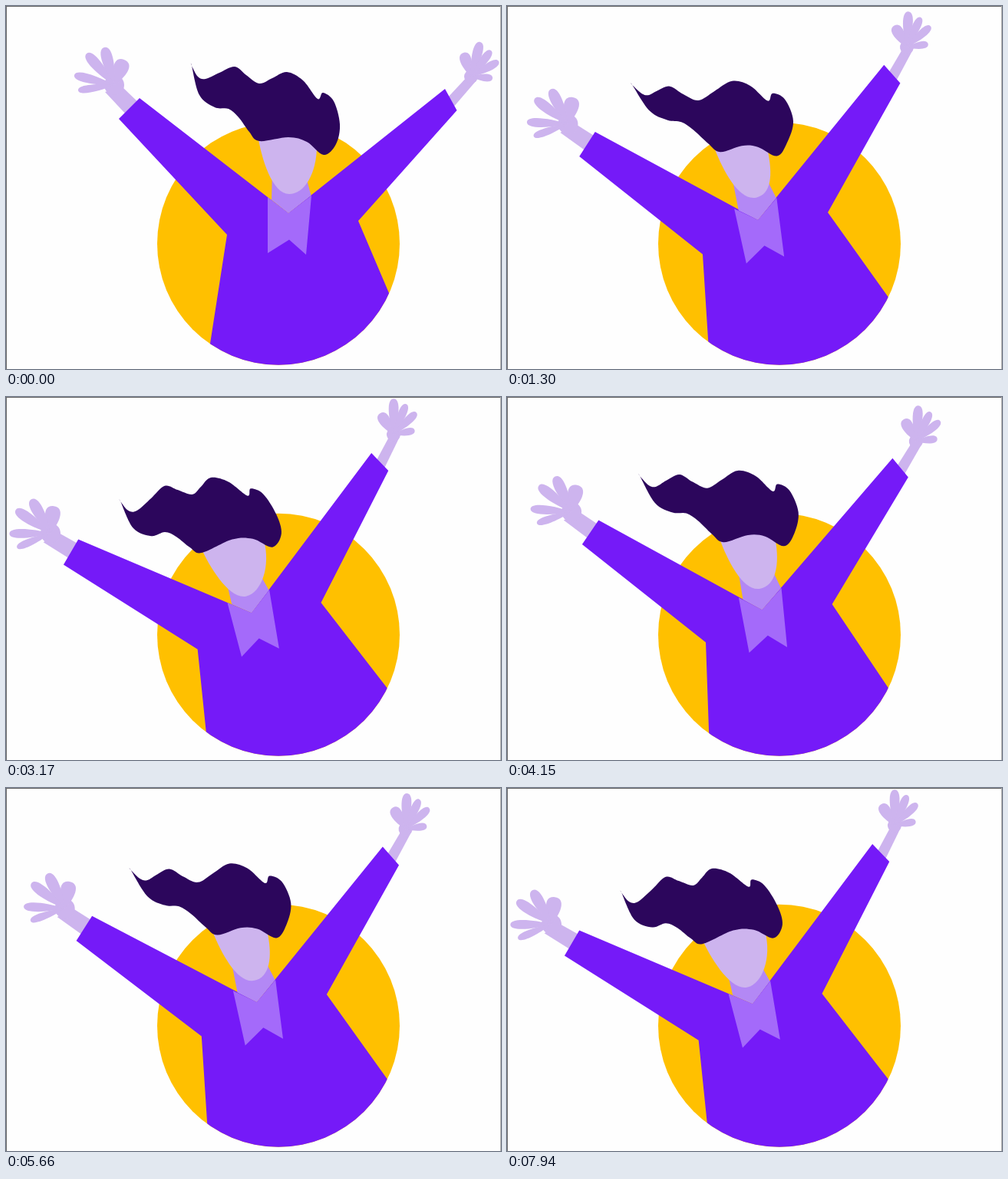
An HTML page with a canvas that plays this animation: 645 by 473 pixels, repeating every 8 s.

```html
<!DOCTYPE html>
<html lang="en">
<head>
<meta charset="utf-8">
<style>
  html, body { margin: 0; width: 100%; height: 100%; overflow: hidden; background: #fefefe; }
  canvas { display: block; }
</style>
</head>
<body>
<canvas id="stage" width="645" height="473"></canvas>
<script>
const ctx = document.getElementById('stage').getContext('2d');
const LOOP = 8000, CYCLE = 4835;
const YELLOW = '#ffc000', PURPLE = '#751af8', SKIN = '#cdb4ee',
      NECK = '#b388f5', COLLAR = '#a46afa', HAIR = '#2c065c';

// Key points of the hair at rest, from the tail along the top and back below
const HAIR_SHAPE = [
  [242, 78], [242, 78], [250, 92], [260, 95], [278, 87], [298, 79], [313, 90], [330, 101],
  [347, 94], [366, 86], [387, 97], [406, 121], [413, 113], [427, 124], [435, 154], [430, 180],
  [414, 194], [392, 177], [368, 171], [330, 176], [317, 164], [303, 145], [290, 134],
  [272, 132], [252, 116]
];

// 0 to 1 between two times, cosine eased
function ease(t, from, to) {
  const p = Math.min(1, Math.max(0, (t - from) / (to - from)));
  return (1 - Math.cos(Math.PI * p)) / 2;
}
const bump = (t, from, peak, to) => ease(t, from, peak) - ease(t, peak, to);

function swayAngle(t) {
  return -14.7 * (bump(t, 42, 1089, 1110) + ease(t, 1089, 1110)
    - ease(t, 1120, 1830) + ease(t, 1872, 2962) - ease(t, 3770, 4877));
}

function armWave(t) {
  return 2 * (bump(t, 0, 520, 1050) + bump(t, 1060, 1540, 1950)
    + bump(t, 2250, 2640, 3020) + bump(t, 3300, 3800, 4350));
}

// A ripple runs through the hair while the tail rises
function ripple([x, y], lift) {
  const tail = Math.min(1, Math.max(0, (320 - x + 0.3 * (y - 100)) / 60));
  const phase = Math.PI * (x - 298 - 1.2 * (y - 85)) / 80;
  return [x + lift * (2 - 7 * Math.cos(phase)), y - lift * 15 * tail];
}

function fill(color, path) {
  ctx.fillStyle = color;
  ctx.fill(path);
}

function polygon(color, points) {
  const path = new Path2D();
  points.forEach(([x, y]) => path.lineTo(x, y));
  fill(color, path);
}

function blob(color, points) {
  const n = points.length, at = i => points[(i + n) % n];
  const path = new Path2D();
  path.moveTo(...at(0));
  for (let i = 0; i < n; i++) {
    const [a, b, c, d] = [at(i - 1), at(i), at(i + 1), at(i + 2)];
    path.bezierCurveTo(b[0] + (c[0] - a[0]) / 6, b[1] + (c[1] - a[1]) / 6,
                       c[0] - (d[0] - b[0]) / 6, c[1] - (d[1] - b[1]) / 6, c[0], c[1]);
  }
  fill(color, path);
}

// Teardrop fingers spread from the palm; each is tip x, tip y, width
function hand([px, py], radius, fingers) {
  const palm = new Path2D();
  palm.arc(px, py, radius, 0, 7);
  fill(SKIN, palm);
  for (const [x, y, w] of fingers) {
    const length = Math.hypot(x - px, y - py);
    const drop = new Path2D();
    drop.bezierCurveTo;
    drop.moveTo(0, 0);
    drop.bezierCurveTo(0.4 * length, -0.5 * w, length, -0.8 * w, length, 0);
    drop.bezierCurveTo(length, 0.8 * w, 0.4 * length, 0.5 * w, 0, 0);
    ctx.save();
    ctx.translate(px, py);
    ctx.rotate(Math.atan2(y - py, x - px));
    fill(SKIN, drop);
    ctx.restore();
  }
}

function turn(degrees, x, y) {
  ctx.translate(x, y);
  ctx.rotate(degrees * Math.PI / 180);
  ctx.translate(-x, -y);
}

function drawHands(wave, dx, dy) {
  ctx.save();
  ctx.translate(dx, dy);
  turn(1.3 * wave, 160, 133);
  polygon(SKIN, [[151, 105], [176, 129], [158, 143], [129, 112]]);
  hand([141, 103], 13, [[154, 70, 20], [128, 54, 15], [105, 62, 14], [89, 90, 12], [94, 110, 10]]);
  ctx.restore();

  polygon(SKIN, [[602, 91], [574, 121], [582, 133], [613, 97]]);
  hand([606, 92], 9, [[596, 61, 15], [618, 47, 13], [632, 58, 11], [642, 72, 11], [634, 94, 10]]);
}

function drawFace(lift) {
  const x = 369 + 3 * lift, y = 245 - 4 * lift;
  const left = 328 + 5 * lift, right = 405 - 5 * lift;
  fill(SKIN, new Path2D(`M${left} 168C${left + 5} 200 ${x - 22} ${y} ${x} ${y}
    C${x + 20} ${y} ${right} 218 ${right} 182L380 160Z`));
}

function draw(time) {
  const t = time % CYCLE;
  const wave = armWave(t);
  const lift = Math.min(wave, 1.5) - 0.57 * bump(t, 2600, 3105, 3700);
  const dx = 11.5 * wave, dy = -8 * wave;

  ctx.fillStyle = '#fefefe';
  ctx.fillRect(0, 0, 645, 473);
  const disc = new Path2D();
  disc.arc(355, 309.7, 158, 0, 7);
  fill(YELLOW, disc);

  ctx.save();
  // The body is cut off by the disc at the bottom only
  const mask = new Path2D(disc);
  mask.rect(0, 0, 645, 335);
  ctx.clip(mask);
  turn(swayAngle(t), 388, 462);

  drawHands(wave, dx, dy);
  polygon(PURPLE, [[174 + dx, 120 + dy], [147 + dx, 147 + dy], [288, 298], [250, 543],
                   [579, 562], [459, 280], [587.5, 136], [572, 108], [368, 270]]);
  polygon(NECK, [[347, 212], [346, 252.5], [368, 270], [397.5, 247], [389, 215]]);
  polygon(COLLAR, [[341, 249], [341, 322], [369, 304.5], [391, 324], [398, 247], [368, 270]]);
  drawFace(lift);
  blob(HAIR, HAIR_SHAPE.map(point => ripple(point, lift)));
  ctx.restore();

  ctx.fillStyle = '#666';
  ctx.fillRect(0, 0, 645, 1);
  ctx.fillRect(0, 0, 1, 473);
  ctx.fillStyle = '#aaa';
  ctx.fillRect(644, 0, 1, 473);
}

const start = performance.now();
function play() {
  draw((performance.now() - start) % LOOP);
  requestAnimationFrame(play);
}
play();
</script>
</body>
</html>
```
